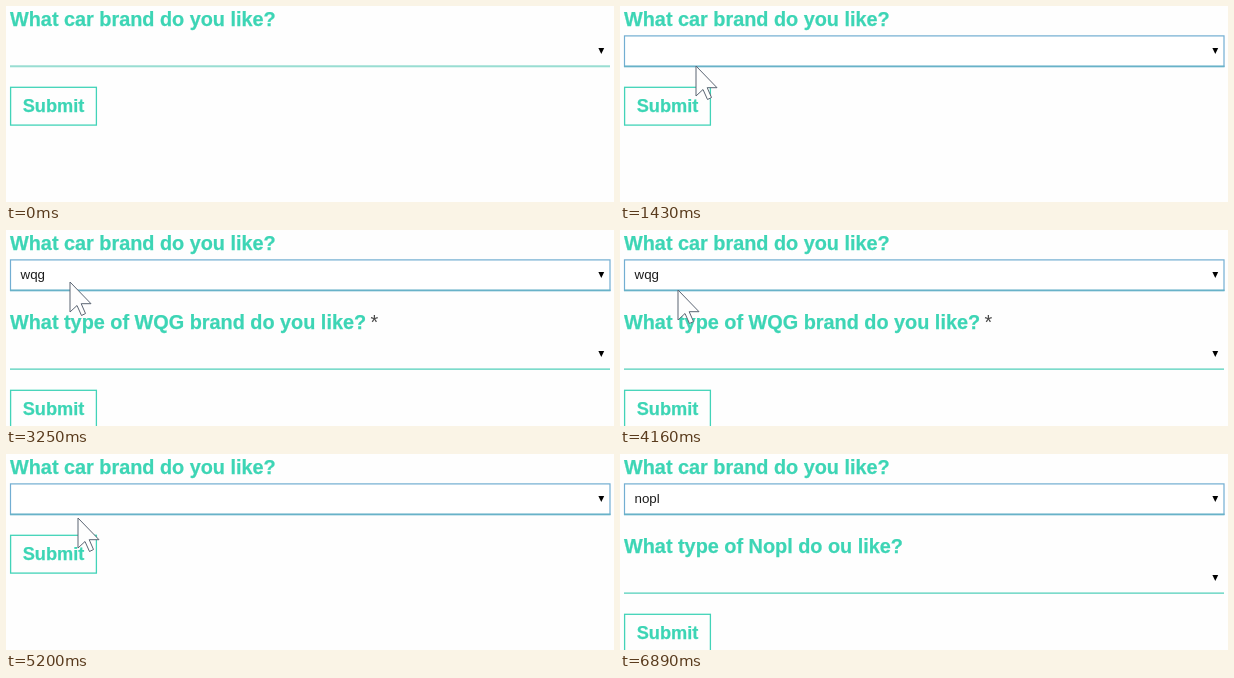
An HTML page that plays this animation: 608x196 px, repeating every 7.02 s.

```html
<!DOCTYPE html>
<html lang="en">
<head>
<meta charset="utf-8">
<title>Conditional form</title>
<style>
  html, body { margin: 0; width: 100%; height: 100%; overflow: hidden; background: #fefefe; }
  svg { display: block; width: 608px; height: 196px; font-family: "Liberation Sans", Arial, sans-serif; }
  .bold { font-weight: 700; fill: #3dd5b5; stroke: #3dd5b5; stroke-width: .25px; }
  .title { font-size: 19.85px; }
  .label { font-size: 18.2px; }
  .value { font-size: 13.33px; fill: #1c1c1c; }
</style>
</head>
<body>
<svg viewBox="0 0 608 196">
  <defs><path id="arrow" d="M592.4 42h5.8l-2.9 6z"/></defs>

  <text class="bold title" x="4" y="20">What car brand do you like?</text>
  <rect id="line" x="4" y="59.3" width="600" height="2" fill="#98ddd2"/>
  <g id="focus">
    <rect x="4.5" y="29.9" width="599.5" height="30.6" fill="#fff" stroke="#72aed2" stroke-width="1.2"/>
    <path d="M4 60.4H604.5" stroke="#68b2c8" stroke-width="1.7"/>
  </g>
  <text id="value" class="value" x="14.5" y="49.3"></text>
  <use href="#arrow"/>

  <g id="followUp">
    <text id="question" class="bold title" x="4" y="99"></text>
    <text id="star" x="364.5" y="99" font-size="19.85" fill="#484848">*</text>
    <use href="#arrow" y="79"/>
    <path d="M4 139.2H604" stroke="#50cfba" stroke-width="1.3"/>
  </g>

  <g id="button">
    <rect x="4.6" y="81.3" width="85.8" height="37.8" fill="none" stroke="#42d3b8" stroke-width="1.3"/>
    <text class="bold label" x="16.7" y="105.9">Submit</text>
  </g>

  <path id="cursor" d="M0 0V30L7 23.5L11.5 33.5L15.5 31.5L11.2 21.7H21Z"
        fill="#fefefe" stroke="#5b6573" stroke-linejoin="round"/>
</svg>
<script>
const LOOP = 7020, STEP = 130, TRAVEL = 390;
const FOCUS_AT = 1170, CURSOR_IN = 130, CURSOR_OUT = 6890;

// The pointer rests at each stop and arrives there at the given time.
const stops = [
  { at: 130, x: 38, y: 113 },
  { at: 780, x: 82, y: 46 },
  { at: 1430, x: 76, y: 60 },
  { at: 2210, x: 53.5, y: 98 },
  { at: 3250, x: 64, y: 52 },
  { at: 4160, x: 58, y: 60 },
  { at: 5200, x: 72, y: 64 },
  { at: 6110, x: 56, y: 112 },
  { at: 6760, x: 16, y: 80 }
];

const choices = [
  { at: 0, value: "", question: "" },
  { at: 2080, value: "wqg", question: "What type of WQG brand do you like?", star: true },
  { at: 4420, value: "", question: "" },
  { at: 5980, value: "nopl", question: "What type of Nopl do ou like?" }
];

const el = id => document.getElementById(id);
const [line, focus, value, followUp, question, star, button, cursor] =
  ["line", "focus", "value", "followUp", "question", "star", "button", "cursor"].map(el);

const show = (node, on) => node.setAttribute("display", on ? "inline" : "none");
const move = (node, x, y) => node.setAttribute("transform", `translate(${x} ${y})`);
const ease = p => p * p * (3 - 2 * p);
const progress = (t, end) => ease(Math.min(1, Math.max(0, 1 - (end - t) / TRAVEL)));

// Each leg is added in turn, so finished legs sum up to the current stop.
function along(axis, t) {
  return stops.reduce((sum, stop, i) =>
    i ? sum + (stop[axis] - stops[i - 1][axis]) * progress(t, stop.at) : stop[axis], 0);
}

function draw(time) {
  const t = Math.floor((time % LOOP) / STEP) * STEP;
  const choice = choices.filter(c => c.at <= t).pop();
  const open = choice.question !== "";
  const focused = t >= FOCUS_AT;

  show(line, !focused);
  show(focus, focused);
  value.textContent = choice.value;
  question.textContent = choice.question;
  show(followUp, open);
  show(star, choice.star);
  move(button, 0, open ? 79 : 0);
  show(cursor, t >= CURSOR_IN && t < CURSOR_OUT);
  move(cursor, along("x", t), along("y", t));
}

const start = performance.now();
function tick() {
  draw(performance.now() - start);
  requestAnimationFrame(tick);
}
tick();
</script>
</body>
</html>
```
